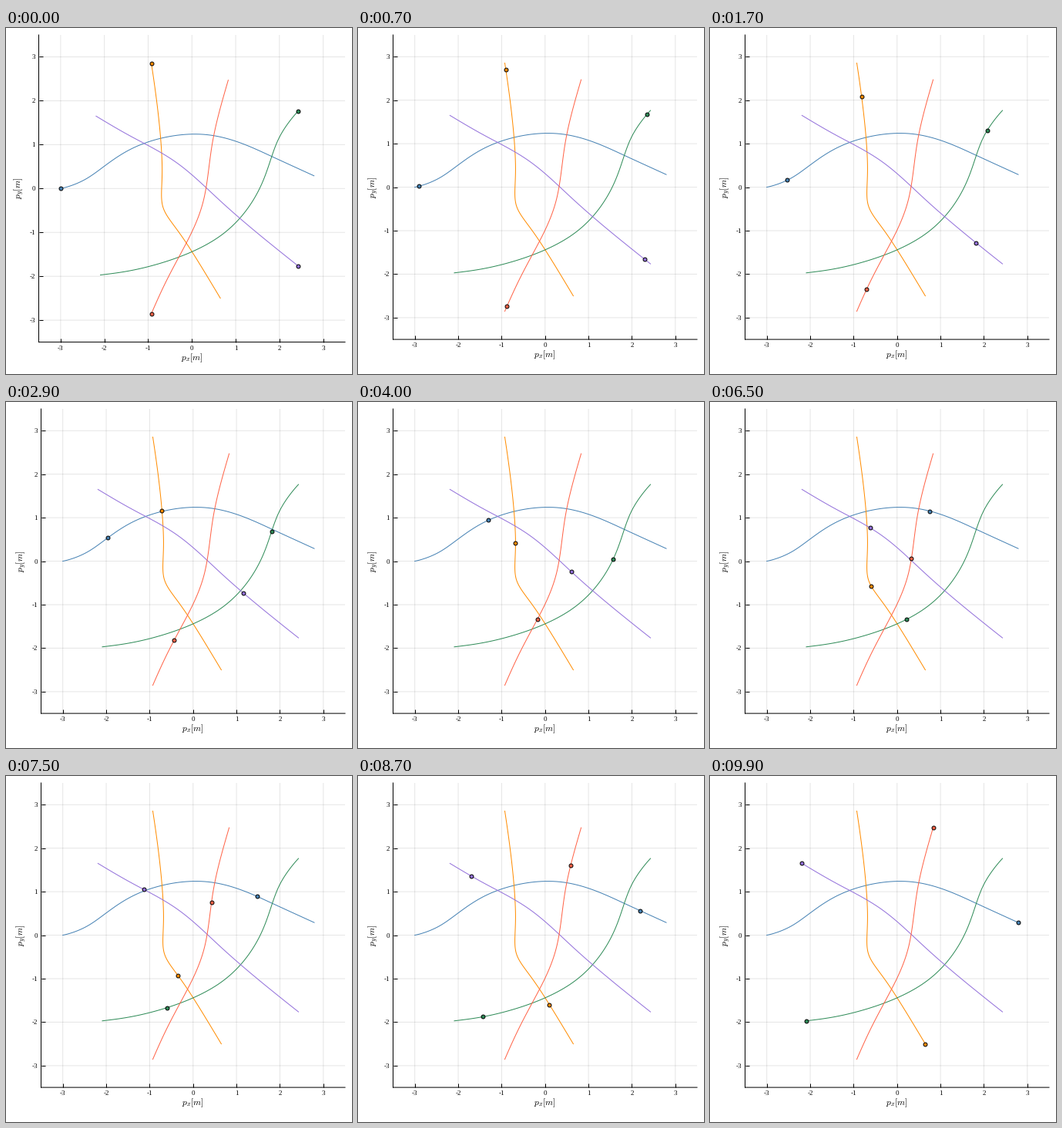
A matplotlib script for the animation above (10 s loop, 449 by 449 pixels).

```python
import matplotlib.pyplot as plt
import numpy as np
from matplotlib.animation import FuncAnimation

SIZE, DPI = 449, 64
PX = 72 / DPI  # points per pixel
FRAMES, INTERVAL = 100, 100
RADIUS = 3

# Plot area as left, right, top, bottom in pixels
FIRST_AREA = (42.5, 440, 9, 407.6)
AREA = (45.5, 440, 9, 404.1)

# Robots start evenly spaced on a circle, clockwise from the left, and
# cross it through these waypoints, which are evenly spaced in time.
ROUTES = {
    "steelblue": [(-2.40, 0.23), (-1.33, 0.93), (0.30, 1.23), (1.74, 0.77), (2.79, 0.29)],
    "darkorange": [(-0.79, 1.87), (-0.68, 0.44), (-0.665, -0.41), (-0.21, -1.12), (0.65, -2.50)],
    "seagreen": [(2.00, 1.17), (1.58, 0.07), (0.635, -1.09), (-0.92, -1.76), (-2.09, -1.97)],
    "mediumpurple": [(1.66, -1.15), (0.63, -0.265), (-0.33, 0.575), (-1.34, 1.16), (-2.19, 1.65)],
    "tomato": [(-0.64, -2.22), (-0.19, -1.36), (0.26, -0.29), (0.47, 1.05), (0.83, 2.47)],
}


def spline(p, u):
    """Cubic spline through p at u = 0, 1, 2..., starting from rest."""
    n = len(p)
    a = 4 * np.eye(n) + np.eye(n, k=1) + np.eye(n, k=-1)
    b = np.zeros_like(p)
    b[1:-1] = 3 * (p[2:] - p[:-2])
    b[-1] = 3 * (p[-1] - p[-2])
    a[0, :2] = 1, 0
    a[-1, -1] = 2
    m = np.linalg.solve(a, b)
    i = np.minimum(u.astype(int), n - 2)
    s = (u - i)[:, None]
    r = 1 - s
    return (p[i] * (1 + 2 * s) * r**2 + p[i + 1] * (3 - 2 * s) * s**2
            + m[i] * s * r**2 - m[i + 1] * r * s**2)


def robot_path(k, route):
    angle = np.pi - 2 * np.pi * k / len(ROUTES)
    start = (RADIUS * np.cos(angle), RADIUS * np.sin(angle))
    return spline(np.array([start, *route]), np.linspace(0, len(route), FRAMES))


def place(ax, area):
    left, right, top, bottom = area
    ax.set_position([left / SIZE, 1 - bottom / SIZE,
                     (right - left) / SIZE, (bottom - top) / SIZE])


plt.rcParams["mathtext.fontset"] = "cm"
plt.rcParams["font.family"] = "Liberation Serif"
plt.rcParams["axes.unicode_minus"] = False

fig = plt.figure(figsize=(SIZE / DPI, SIZE / DPI), dpi=DPI, facecolor="white")
ax = fig.add_axes([0, 0, 1, 1])
ax.set(xlim=(-3.5, 3.5), ylim=(-3.5, 3.5),
       xticks=range(-3, 4), yticks=range(-3, 4))
ax.set_axisbelow(True)
ax.grid(color="black", alpha=0.1, lw=PX)
ax.spines[["top", "right"]].set_visible(False)
ax.spines[["left", "bottom"]].set_linewidth(PX)
plt.setp([*ax.get_xgridlines(), *ax.get_ygridlines(), *ax.spines.values()],
         snap=False)
ax.tick_params(direction="in", length=5 * PX, width=PX, labelsize=9 * PX)
ax.tick_params(axis="x", pad=4 * PX)
ax.tick_params(axis="y", pad=4.3 * PX)
ax.set_xlabel("$p_x[m]$", fontsize=11.5 * PX, va="center")
ax.set_ylabel("$p_y[m]$", fontsize=11.5 * PX, va="center")
ax.xaxis.set_label_coords(0.5, -0.051)
ax.yaxis.set_label_coords(-0.0635, 0.5)

paths, dots = [], []
for k, (color, route) in enumerate(ROUTES.items()):
    path = robot_path(k, route)
    ax.plot(*path.T, color=color, lw=PX, zorder=2)
    dot, = ax.plot([], [], "o", color=color, ms=4.9 * PX, mec="black",
                   mew=PX, zorder=3)
    paths.append(path)
    dots.append(dot)


def update(frame):
    place(ax, AREA if frame else FIRST_AREA)
    for path, dot in zip(paths, dots):
        dot.set_data(path[frame:frame + 1].T)
    return dots


anim = FuncAnimation(fig, update, frames=FRAMES, interval=INTERVAL,
                     repeat=True, repeat_delay=0, blit=False)
plt.show()
```
